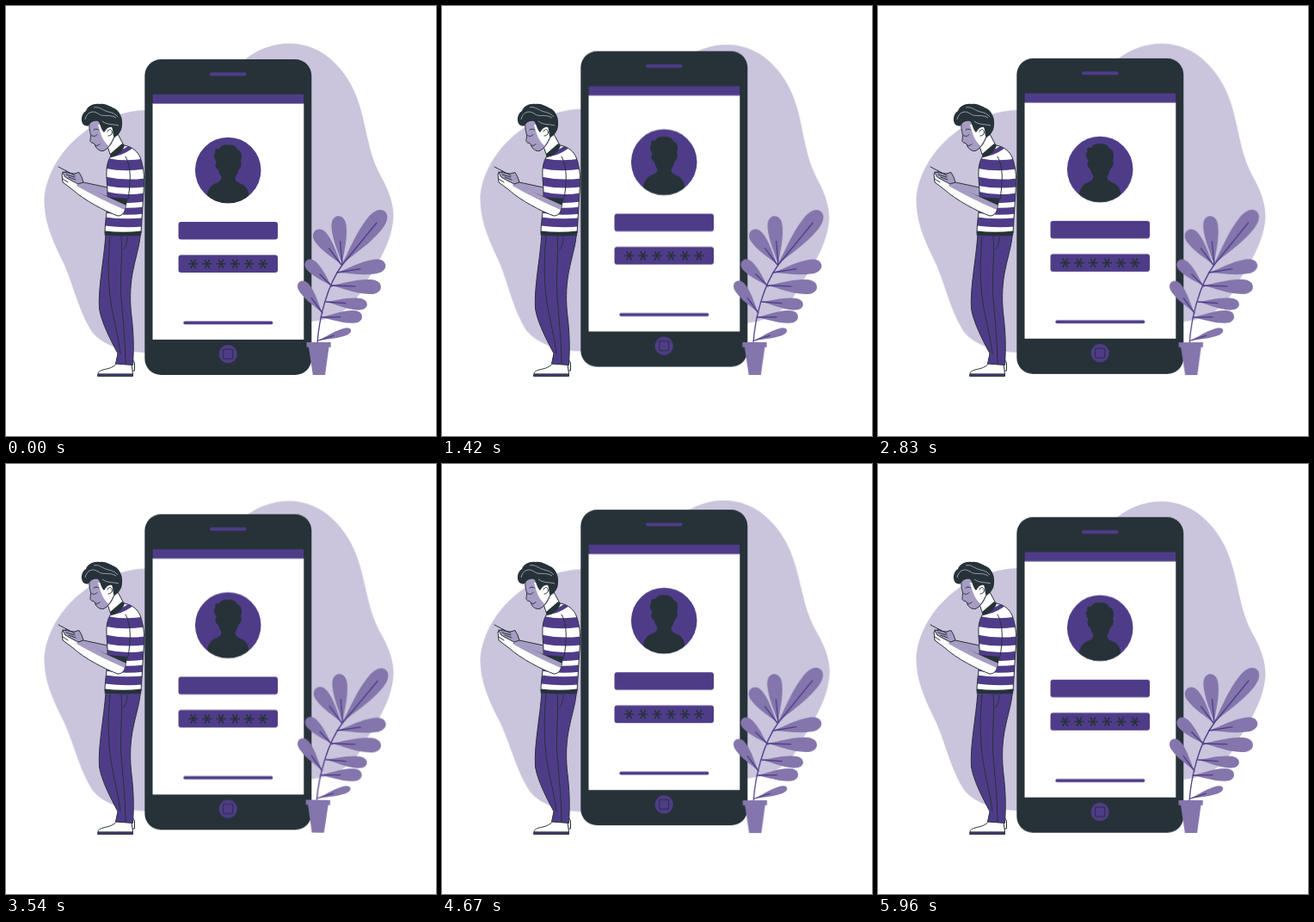
An HTML page without scripts that plays this animation: 500x500 px, repeating every 6 s.

```html
<!DOCTYPE html>
<html lang="en">
<head>
<meta charset="utf-8">
<title>Login on a phone</title>
<style>
html, body { margin: 0; width: 100%; height: 100%; overflow: hidden; background: #fff; }
svg { display: block; width: 100%; height: 100%; }
.p { fill: #4f3c89; }
.d { fill: #263238; }
.m { fill: #8476ac; }
.s { fill: #a79dc4; }
.l { fill: #cac4dc; }
.w { fill: #fff; }
.line { stroke: #263238; stroke-width: 1; stroke-linejoin: round; stroke-linecap: round; }
.ink { fill: none; }
.blob { transform-origin: 248px 224px; animation: sway 6s linear infinite; }
.plant { transform-origin: 391px 333px; animation: sway 3s linear infinite; }
.phone { animation: float 3s linear infinite; }
.vein { fill: none; stroke: #4f3c89; stroke-width: 1.3; stroke-linecap: round; vector-effect: non-scaling-stroke; }
@keyframes sway {
  0%, 100% { transform: rotate(0deg); }
  25% { transform: rotate(1deg); }
  75% { transform: rotate(-1deg); }
}
@keyframes float {
  0%, 100% { transform: translateY(0); }
  50% { transform: translateY(-10px); }
}
</style>
</head>
<body>
<svg viewBox="0 0 500 500">
  <defs>
    <path id="leaf" class="m" d="M0 0C25-5 48-16 78-16C92-16 100-9 100 0C100 9 92 16 78 16C48 16 25 5 0 0Z"/>
    <g id="sprig"><use href="#leaf"/><path class="vein" d="M0 0H48"/></g>
    <path id="star" d="M-5.700 0H5.700M-2.900-5L2.900 5M2.900-5L-2.900 5" stroke="#263238" stroke-width="1.600"/>
    <clipPath id="disc"><circle cx="258.200" cy="191" r="38.300"/></clipPath>
    <path id="torso" d="M121 176C126 168 132 164 138 162C147 164 153 169 156 176C160 187 161 198 160.500 208L157 264L115 264C115 248 119 235 118 215C117 198 115 186 121 176Z"/>
    <clipPath id="body"><use href="#torso"/></clipPath>
  </defs>

  <g class="blob">
    <path class="l" d="M44.500 228C45 180 95 122 165 121C215 120 240 88 278 62C310 37 354 36 384 68C410 95 414 126 421 156C425 175 430 187 437 200C446 216 451 232 450.500 246C448 282 425 308 411 335C396 358 375 365 355 367C290 375 240 400 165 403C140 403 114 396 100 379C83 352 77 318 64 293C52 268 45 250 44.500 228Z"/>
  </g>

  <g class="phone">
    <rect class="d" x="161.300" y="62" width="194" height="367" rx="19"/>
    <rect class="p" x="237" y="77.300" width="42.500" height="4" rx="2"/>
    <rect class="w" x="170.500" y="113.300" width="175.800" height="274.600"/>
    <rect class="p" x="170.700" y="102.700" width="175.400" height="10.700"/>
    <circle class="p" cx="258.200" cy="191" r="38.300"/>
    <g class="d" clip-path="url(#disc)">
      <path d="M245 181C241 177 241 171 244 170C241 167 245 165 248 166C250 161.500 255 161 259 161.500C264 161 268 163 269 167C274 168 275 174 273 181C275 183 273 189 270.500 190C269 196 267 198 266.500 200C266.500 204 270 205 274 207C281 210 283 217 284 232H232C233 217 236 210 242 207C246 205 250 204 250.500 200C250.500 198 248 196 246.500 190C243 189 242.500 183 245 181Z"/>
    </g>
    <rect class="p" x="200.500" y="251" width="115.500" height="20.500" rx="3"/>
    <rect class="p" x="200.500" y="289.500" width="115.500" height="20.500" rx="3"/>
    <use href="#star" x="217.700" y="299.800"/>
    <use href="#star" x="233.900" y="299.800"/>
    <use href="#star" x="250.100" y="299.800"/>
    <use href="#star" x="266.300" y="299.800"/>
    <use href="#star" x="282.500" y="299.800"/>
    <use href="#star" x="298.700" y="299.800"/>
    <rect class="p" x="206.300" y="366.600" width="104" height="3.600" rx="1.800"/>
    <circle class="p" cx="258.200" cy="404.700" r="10.600"/>
    <rect class="line ink" x="252.700" y="399.200" width="11" height="11" rx=".8"/>
  </g>

  <g class="man">
    <!-- shoes and trousers -->
    <path class="w line" d="M146 409L149.500 415L149.500 424H142Z"/>
    <path class="w line" d="M129 415L146 416L147.500 428H107C107 425.500 109 424 113 423C120 421.500 126 420 129 415Z"/>
    <path class="p line" d="M107 428.300H147.500V430.500H107Z" stroke-width=".8"/>
    <path class="p line" d="M116 265H156.500C155 281 150 294 147 311C144 328 144 345 146 361C148 377 149 396 147.500 417.500L127.500 416L130 404C122 389 111 368 108.500 352C107 326 114 296 116 265Z"/>
    <path class="line ink" d="M121 268C118 300 119 325 122 345C125 365 131 385 133 404M134 268C136 290 132 315 134 340C136 365 139 390 139 416M141 269C141 276 139 280 137 283"/>

    <!-- far arm -->
    <path class="s line" d="M118 211L90 205L82 197L74 201L82 209L118 224Z"/>

    <!-- neck and head -->
    <path class="w line" d="M117 160L122 175L137 162L129 147L119 149Z"/>
    <path class="s line" d="M97 136C96 145 99 148 98.500 152C98 156 97 157 99.500 159C102 159 103 160 104 163C105 166 109 169 113 168.500C119 166 123 160 126 152L128 137L116 127Z" stroke-width=".8"/>
    <path class="w" d="M107 138C110 149 112 156 119 162.500C122 159 125 153 127 148L126 137Z"/>
    <path class="line ink" d="M99 150C101 152 104 152 106 149.500M102 144C104 142.500 106 143 107.500 144M104 162C106 163 108 162 109 160.500" stroke-width=".8"/>
    <path class="d" d="M90 138C86 133 88 125 93 122C95 116 102 113 109 114C116 113 121 117 126 119C132 122 136 130 135 138C135 145 131 150 126 153C124 151 125 145 123 141C120 140 117 142 114 147C110 143 110 137 107 134C102 133 98 135 96 139C94 140 92 139.500 90 138Z"/>
    <path d="M92 132C94 123 101 121 107 125C113 130 120 125 128 130M102 118C108 116 113 122 119 123C124 124 128 126 130 129M112 134C118 139 126 137 131 139" fill="none" stroke="#cac4dc" stroke-width=".7"/>
    <path class="line ink" d="M118 146C120 142 123 143 123.500 147C123 150 121 151 119 151" stroke-width=".6"/>

    <!-- striped shirt -->
    <use class="w" href="#torso"/>
    <g clip-path="url(#body)" fill="none" stroke="#4f3c89" stroke-width="10">
      <path d="M112 172Q128 176 145 164" stroke-width="5"/>
      <path d="M112 182Q138 188 164 183" stroke-width="12"/>
      <path d="M112 203Q138 209 164 205"/>
      <path d="M112 220Q138 227 164 222"/>
      <path d="M112 236Q138 241 164 237" stroke-width="8"/>
      <path d="M112 250Q138 254 164 251"/>
    </g>
    <use class="line ink" href="#torso"/>
    <path class="line ink" d="M139 175C146 187 145 205 142 224"/>
    <path class="d" d="M122 176L121 172L135 160L138 162C136 169 129 175 122 176Z"/>
    <path class="d" d="M115 261.500Q136 264 157.500 261.500L157 267Q136 268 114.500 266.500Z"/>

    <!-- near arm, hands and handset -->
    <path class="d" d="M117 222L141.500 224L138.500 237Z"/>
    <path class="w line" d="M139 232C139 239 136 244 130 244C116 239 91 226 78 214L66 205L65 195L71 192L82 203L88 208Z"/>
    <path class="s" d="M84 205L90 207L118 222L139 231.500L138 237Q108 224 82 209Z"/>
    <path class="s line" d="M66 193L79 195L85 193.500L88 199L90 205L84 207L76 203L69 199Z"/>
    <path class="line ink" d="M70 196L80 199M73 199L81 202M66 201L72 205" stroke-width=".8"/>
    <path class="line ink" d="M61 187L80 197" stroke-width="1.800"/>
  </g>

  <g class="plant">
    <use href="#leaf" transform="translate(390 301) rotate(-51) scale(.8 .66)"/>
    <use href="#sprig" transform="translate(391 301) rotate(-95) scale(.57 .54)"/>
    <use href="#sprig" transform="translate(390 301) rotate(-127) scale(.5 .52)"/>
    <use href="#sprig" transform="translate(385 310) rotate(-9) scale(.57 .52)"/>
    <use href="#sprig" transform="translate(378 325) rotate(2) scale(.58 .53)"/>
    <use href="#sprig" transform="translate(379 326) rotate(-135) scale(.42 .44)"/>
    <use href="#sprig" transform="translate(372 344) rotate(4) scale(.48 .43)"/>
    <use href="#sprig" transform="translate(368 357) rotate(-126) scale(.45 .44)"/>
    <use href="#sprig" transform="translate(366 362) rotate(-1) scale(.48 .46)"/>
    <use href="#sprig" transform="translate(363 389) rotate(-18) scale(.4 .27)"/>
    <path class="vein" d="M362 392C364 364 373 325 391 301L431 252"/>
    <path class="m" d="M349.500 391H377.700V396.700H375.500L371 429H356.800L352 396.700H349.500Z"/>
  </g>
</svg>
</body>
</html>
```
